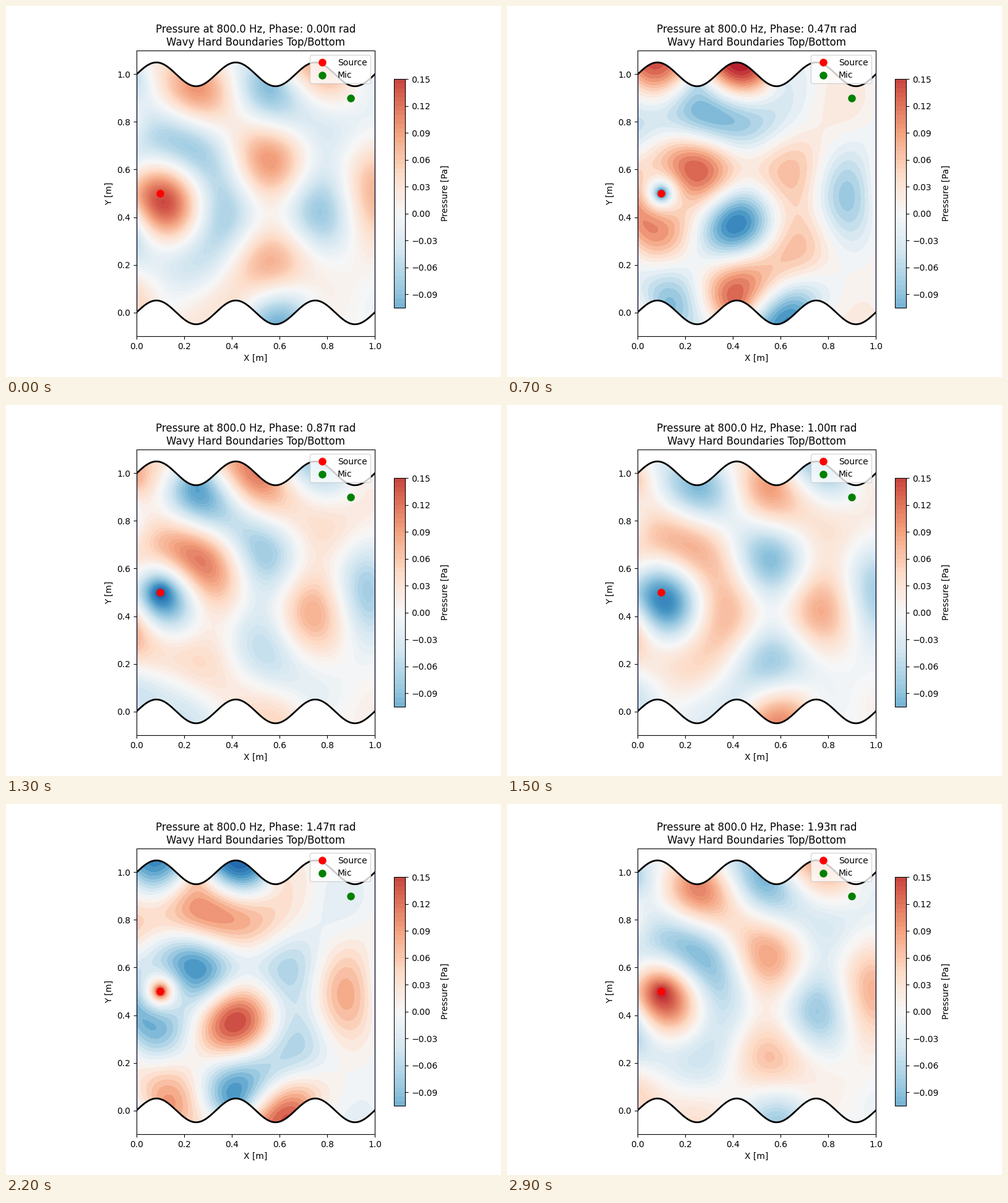
Recreate the animation shown at these times as a matplotlib script. Size 800 by 600 pixels, loop 3 s.

```python
import numpy as np
import matplotlib.pyplot as plt
from matplotlib.animation import FuncAnimation

FREQ, SPEED, DENSITY, FLOW = 800.0, 340.0, 1.21, 1e-4
OMEGA = 2 * np.pi * FREQ
K = OMEGA / SPEED
SOURCE, MIC = (0.1, 0.5), (0.9, 0.9)
NX, NV = 150, 120
FRAMES, INTERVAL = 30, 100
COLOR_LIMIT = 0.222


def wave(x):
    return 0.05 * np.sin(6 * np.pi * x)


def line_matrices(n, h):
    """Stiffness, mass and slope matrices of linear elements on a line."""
    stiff, mass, slope = (np.zeros((n + 1, n + 1)) for _ in range(3))
    for i in range(n):
        s = slice(i, i + 2)
        stiff[s, s] += np.array([[1, -1], [-1, 1]]) / h
        mass[s, s] += np.array([[2, 1], [1, 2]]) * h / 6
        slope[s, s] += np.array([[-0.5, -0.5], [0.5, 0.5]])
    return stiff, mass, slope


def solve_pressure():
    """Helmholtz field in the sheared channel: hard walls, open ends."""
    x = np.linspace(0, 1, NX + 1)
    v = np.linspace(0, 1, NV + 1)
    hx, hv = 1 / NX, 1 / NV
    stiff, mass, slope = line_matrices(NV, hv)
    kx, mx, cx = line_matrices(1, hx)
    tilt = np.diff(wave(x)) / hx

    diag = np.zeros((NX + 1, NV + 1, NV + 1), complex)
    upper = np.zeros((NX, NV + 1, NV + 1), complex)
    for n, a in enumerate(tilt):
        def block(i, j):
            return (kx[i, j] * mass
                    + mx[i, j] * ((1 + a * a) * stiff - K**2 * mass)
                    - a * (cx[i, j] * slope.T + cx[j, i] * slope))
        diag[n] += block(0, 0)
        diag[n + 1] += block(1, 1)
        upper[n] = block(0, 1)
    for end in (0, -1):
        diag[end] += 1j * K * mass

    # Point source shared between its two nearest nodes
    load = np.zeros((NX + 1, NV + 1), complex)
    col = round(SOURCE[0] * NX)
    row = (SOURCE[1] - wave(SOURCE[0])) / hv
    low, part = int(row), row % 1
    strength = 1j * OMEGA * DENSITY * FLOW
    load[col, low:low + 2] = strength * np.array([1 - part, part])

    # Block elimination along x
    gain = np.zeros_like(upper)
    for n in range(NX):
        both = np.linalg.solve(diag[n], np.column_stack([upper[n], load[n]]))
        gain[n], load[n] = both[:, :-1], both[:, -1]
        diag[n + 1] -= upper[n].T @ gain[n]
        load[n + 1] -= upper[n].T @ load[n]
    load[NX] = np.linalg.solve(diag[NX], load[NX])
    for n in range(NX - 1, -1, -1):
        load[n] -= gain[n] @ load[n + 1]

    xx, vv = np.meshgrid(x, v)
    return xx, vv + wave(xx), load.T


X, Y, P = solve_pressure()
fig, ax = plt.subplots(figsize=(8, 6), dpi=100)
state = {}


def draw(n):
    phase = 2 * np.pi * n / FRAMES
    if "field" in state:
        state["field"].remove()
    state["field"] = ax.contourf(
        X, Y, np.real(P * np.exp(1j * phase)), levels=50, cmap="RdBu_r",
        vmin=-COLOR_LIMIT, vmax=COLOR_LIMIT)
    ax.set_title(f"Pressure at {FREQ} Hz, Phase: {phase / np.pi:.2f}π rad\n"
                 "Wavy Hard Boundaries Top/Bottom")


draw(0)
fig.colorbar(state["field"], ax=ax, shrink=0.8, label="Pressure [Pa]")
xs = np.linspace(0, 1, 400)
floor, roof = wave(xs), 1 + wave(xs)
ax.plot(xs, floor, "k-", lw=2)
ax.plot(xs, roof, "k-", lw=2)
for end in (0, 1):
    ax.plot([end, end], [0, 1], "b-", lw=1)
ax.plot(*SOURCE, "ro", markersize=8, label="Source")
ax.plot(*MIC, "go", markersize=8, label="Mic")
ax.set(xlim=(0, 1), ylim=(floor.min() - 0.05, roof.max() + 0.05),
       aspect="equal", xlabel="X [m]", ylabel="Y [m]")
ax.legend(loc="upper right")

anim = FuncAnimation(fig, draw, frames=FRAMES, interval=INTERVAL,
                     init_func=lambda: draw(0), repeat=True, repeat_delay=0)
plt.show()
```
